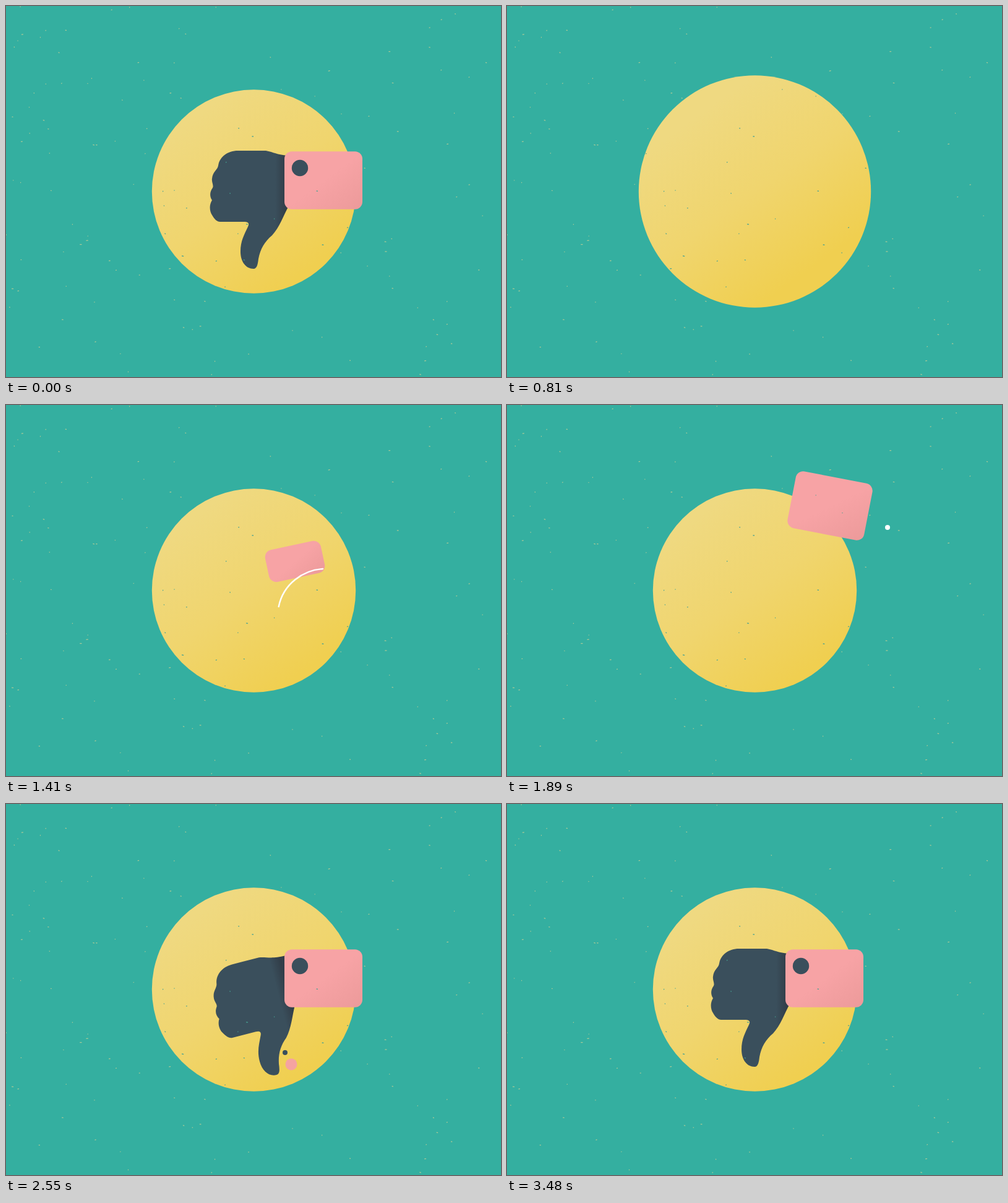
An HTML page that plays this animation: 800x600 px, repeating every 3600 ms.

```html
<!DOCTYPE html>
<html lang="en">
<head>
<meta charset="utf-8">
<title>Thumbs down</title>
<style>
html, body { margin: 0; width: 100%; height: 100%; overflow: hidden; background: #34afa0; }
svg { display: block; width: 100vw; height: 100vh; }
#ribbon, #thread, .specks { fill: none; stroke-linecap: round; }
</style>
</head>
<body>
<svg viewBox="0 0 800 600">
  <defs>
    <linearGradient id="gold" gradientUnits="userSpaceOnUse" x1="-90" y1="-125" x2="90" y2="125">
      <stop stop-color="#efd981"/><stop offset=".5" stop-color="#f0d56e"/><stop offset="1" stop-color="#f0cf50"/>
    </linearGradient>
    <linearGradient id="rose" x2="1" y2="1">
      <stop offset=".5" stop-color="#f7a3a5"/><stop offset="1" stop-color="#ec9a9a"/>
    </linearGradient>
    <linearGradient id="ink" gradientUnits="userSpaceOnUse" x1="435" x2="452" y1="0" y2="0">
      <stop stop-color="#3a4f5c"/><stop offset="1" stop-color="#323e49"/>
    </linearGradient>
    <clipPath id="shapes"><use href="#disc"/><use href="#sleeve"/></clipPath>
    <path id="specks"/>
  </defs>
  <rect width="800" height="600" fill="#34afa0"/>
  <use class="specks" href="#specks" stroke="#a9c997" stroke-width="1.3"/>
  <rect id="disc" fill="url(#gold)"/>
  <path id="hand" fill="url(#ink)" d="M462 242C440 242 432 236 420 234H375C357 234 345 245 343 258C342 265 334 268 333 279C332 285 336 290 334 294C329 301 329 308 333 314C328 322 329 332 333 338C337 345 341 349 346 349H385C391 349 394 351 391 357C385 370 379 380 379 397C379 414 388 425 400 425C406 425 407 417 408 409C411 393 418 381 430 371C442 358 449 338 456 325L478 318V243Z"/>
  <circle id="pinkDrop" fill="#f5a3a0"/>
  <circle id="inkDrop" fill="#3a4f5c"/>
  <path id="ribbon" stroke="#f7a3a5" stroke-width="13" d="M475 261Q496 291 512 328C530 380 440 380 467 253"/>
  <rect id="sleeve" fill="url(#rose)"/>
  <path id="thread" stroke="#fff" stroke-width="2.4" d="M531 266L512 265C480 267 446 290 440 330C432 400 480 445 540 440C610 432 650 330 615 198"/>
  <circle id="dot" fill="#fff"/>
  <circle id="button" fill="#3a4f5c"/>
  <g clip-path="url(#shapes)"><use class="specks" href="#specks" stroke="#46a293" stroke-width="1.3"/></g>
</svg>
<script>
const LOOP = 3600, STEP = 30;
const $ = id => document.getElementById(id);
const set = (id, attrs) => { for (const k in attrs) $(id).setAttribute(k, attrs[k]); };

const circle = (id, cx, cy, r) => set(id, { cx, cy, r: Math.max(0, r) });

const box = (id, cx, cy, w, h, rx, angle) => set(id, {
  x: -w / 2, y: -h / 2, width: w, height: h, rx,
  transform: `translate(${cx} ${cy}) rotate(${angle})`
});

// Shows only the stretch of a path between two distances along it.
const trim = (id, from, to) => set(id, {
  'stroke-dasharray': `${Math.max(0.01, to - from)} 3000`,
  'stroke-dashoffset': -from,
  visibility: to - from > 0.5 ? 'visible' : 'hidden'
});

// Decaying cosine that starts at 1.
const ring = (time, period, decay) => Math.exp(-time / decay) * Math.cos(2 * Math.PI * time / period);

let seed = 7;
const random = () => (seed = seed * 16807 % 2147483647) / 2147483647;
let specks = '';
for (let i = 0; i < 130; i++) {
  const length = 2.2 * random() ** 3;
  specks += `M${800 * random() ** 1.2} ${600 * random()}l${length} ${random() - 0.5}`;
}
set('specks', { d: specks });

function draw(t) {
  if (t < 210) t = LOOP;
  const ease = (from, to) => {
    const u = Math.min(1, Math.max(0, (t - from) / (to - from)));
    return u * u * (3 - 2 * u);
  };

  // The square pops in, then springs out into the disc.
  const pop = ease(375, 570), round = ease(570, 780);
  const spring = t > 570 ? 1 - ring(t - 570, 480, 142) : 0;
  const half = 40 * pop + 124.7 * spring;
  box('disc', 400.5, 300, half * 2, half * 2, half * (0.25 + 0.75 * round), 90 * pop + 53 * round - 143);

  trim('ribbon', 300 * ease(1050, 1300), 300 * ease(930, 1300));
  const grow = ease(1230, 1410), rise = ease(1410, 1830), fall = ease(1890, 2130);
  box('sleeve', 467 + 55 * rise - 9 * fall, 253 - 90 * rise + 119 * fall,
    92 * grow + 34 * rise, 53 * grow + 40.5 * rise, 12 * grow, 68 * grow + 23 * rise - 11 * fall - 80);

  trim('thread', 19 * ease(1050, 1410) + 556 * ease(1410, 1860), 120 * ease(947, 1410) + 455 * ease(1410, 1800));
  circle('dot', 615, 198, 4 * (ease(1815, 1890) - ease(1890, 1980)));

  // The hand swings out of the sleeve and settles.
  const swing = t < 2550 ? 55 - 69.5 * ease(2160, 2550) : -14.5 * ring(t - 2550, 300, 150);
  set('hand', { transform: `translate(470 285) rotate(${swing}) scale(${ease(2160, 2400)}) translate(-470 -285)` });
  circle('button', 475, 262, 13.2 * ease(2130, 2340));

  const fling = ease(2460, 2550), drift = ease(2550, 3480), fade = ease(2550, 3060);
  circle('pinkDrop', 440 + 21 * fling + 13 * drift, 412 + 9 * fling + 13 * drift, 9.5 * (fling - drift));
  circle('inkDrop', 438 + 13 * fling + 29 * fade, 398 + 4 * fling + 20 * fade, 4 * (fling - fade));
}

const start = performance.now();
function tick() {
  const t = (performance.now() - start) % LOOP;
  draw(Math.floor(t / STEP) * STEP);
  requestAnimationFrame(tick);
}
tick();
</script>
</body>
</html>
```
